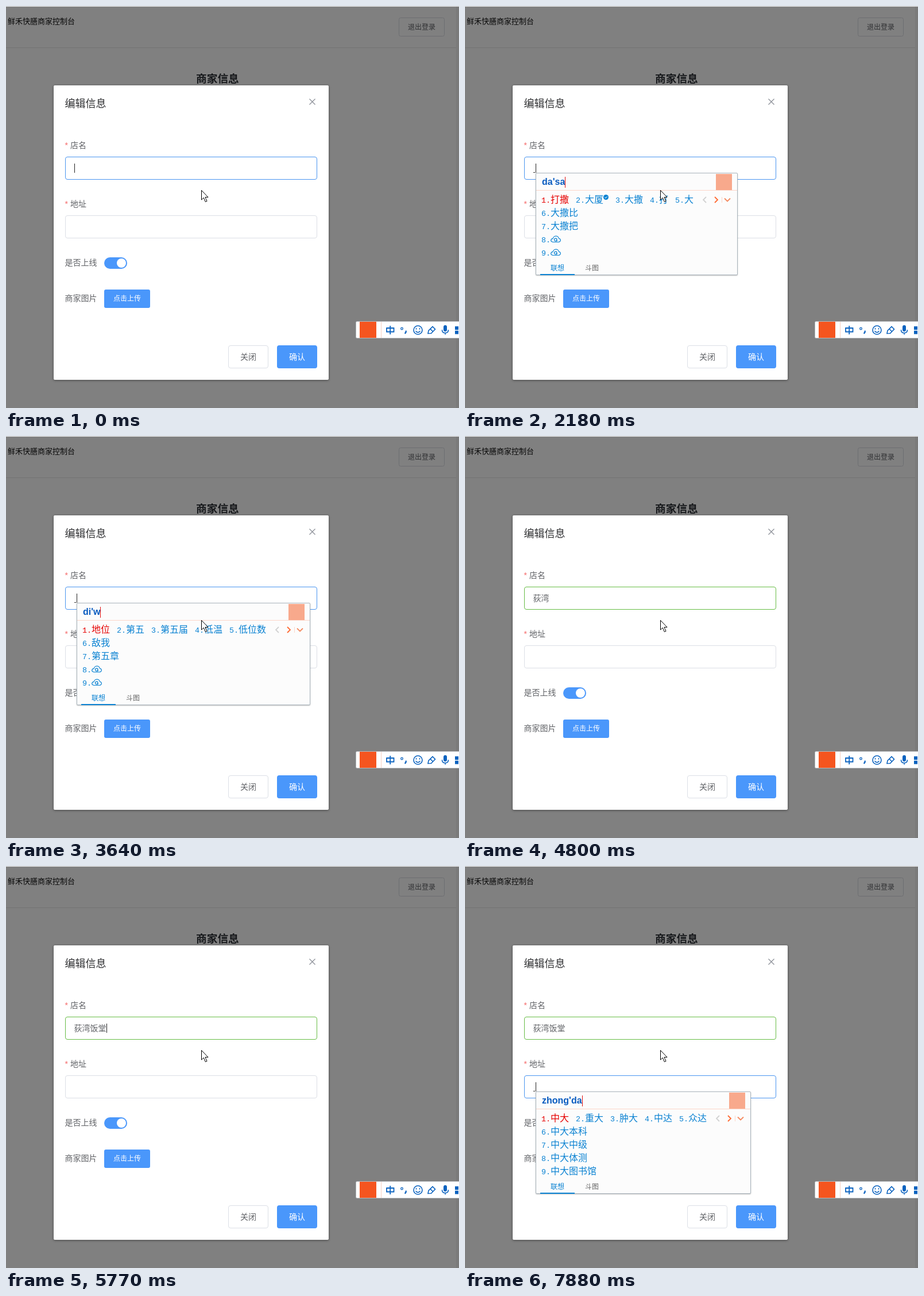
These frames come from a looping animation (789 by 699 pixels, 8000 ms). An HTML page:

```html
<!DOCTYPE html>
<html lang="zh-CN">
<head>
<meta charset="utf-8">
<title>编辑信息</title>
<style>
html, body { margin: 0; width: 100%; height: 100%; overflow: hidden; background: #808080; }
body { position: relative; font-family: "Noto Sans CJK SC", "Noto Sans CJK", sans-serif; }
svg { display: block; }
#stage, #pointer { position: absolute; left: 0; top: 0; }
#stage text { font-size: 14px; fill: #606266; }
#stage .small { font-size: 12px; }
#stage .star { fill: #f56c6c; font-family: "Liberation Sans", sans-serif; }
#dialog { filter: drop-shadow(0 1px 2px rgba(0, 0, 0, .45)); }
.field { fill: #fff; stroke: #dcdfe6; }

#ime {
  position: absolute; box-sizing: border-box; height: 178px; white-space: nowrap;
  background: #fcfcfc; border: 1px solid #a9b4bc; border-radius: 2px;
  box-shadow: 0 1px 2px rgba(0, 0, 0, .25); color: #0a82d2; font-size: 16px; font-weight: 300;
}
#ime .head {
  height: 29px; border-bottom: 1px solid #fcd5c8; padding-left: 10px; margin-bottom: 3px;
  font: bold 16px/29px "Liberation Sans", Arial, sans-serif; color: #0a5cc0;
}
#ime .head b { display: inline-block; width: 1px; height: 19px; background: #e01010; vertical-align: middle; }
#ime .row { height: 23px; line-height: 23px; padding: 0 76px 0 9px; }
#ime .row span + span { margin-left: 12px; }
#ime .first span:first-child { color: #e60000; }
#ime i { font: 13.33px/0 "Liberation Mono", monospace; }
#ime .logo { position: absolute; right: 9px; top: 1px; width: 28px; height: 28px; background: #f8a98c; }
#ime .nav { position: absolute; right: 9px; top: 38px; }
#ime .tick { display: inline-block; width: 9px; height: 9px; vertical-align: 5px; }
#ime .cloud { display: inline-block; vertical-align: -1px; }
#ime .tab { position: absolute; top: 155px; font-size: 12px; line-height: 18px; font-weight: 400; }
#ime .on { left: 7px; width: 60px; height: 20px; text-align: center; border-bottom: 2px solid #0a82d2; }
#ime .off { left: 85px; color: #666; }
</style>
</head>
<body>
<svg id="stage" width="789" height="699">
  <path d="M0 .5H789" stroke="#f4f4f4"/>
  <path d="M0 72.5H784" stroke="#737373"/>
  <path d="M784 1h5v698h-5z" fill="#7a7a7a"/>
  <text x="3" y="31" style="font-size:13px;fill:#080808">鲜禾快膳商家控制台</text>
  <rect x="684.5" y="20.5" width="79" height="32" rx="3" fill="none" stroke="#6d6e72"/>
  <text class="small" x="700" y="41" style="fill:#303133">退出登录</text>
  <text x="331" y="133" style="font-size:18.72px;font-weight:700;fill:#17191c">商家信息</text>

  <rect id="dialog" x="83" y="138" width="479" height="512" rx="2" fill="#fff"/>
  <text x="102.500" y="176" style="font-size:18px;fill:#303133">编辑信息</text>
  <path d="M528.500 161.500l10 10m0-10l-10 10" stroke="#8a8e96" stroke-width="1.200"/>

  <text class="star" x="102.500" y="247">*</text><text x="112" y="247">店名</text>
  <rect id="name" class="field" x="103.500" y="262.500" width="438" height="39" rx="3.500"/>
  <text id="value" x="118.500" y="287"></text>
  <text class="star" x="102.500" y="349">*</text><text x="112" y="349">地址</text>
  <rect id="addr" class="field" x="103.500" y="364.500" width="438" height="39" rx="3.500"/>
  <path id="mark" d="M0 15h3v1h-3z" fill="#333"/>
  <path id="caret" d="M0 0h1v16h-1z" fill="#222"/>

  <text x="102.500" y="451">是否上线</text>
  <rect x="171" y="437" width="40" height="20" rx="10" fill="#4a97fb"/>
  <circle cx="201" cy="447" r="8" fill="#fff"/>
  <text x="102.500" y="513">商家图片</text>
  <rect x="171" y="493" width="80" height="32" rx="3" fill="#4a97fb"/>
  <text class="small" x="187" y="513" style="fill:#fff;font-weight:500">点击上传</text>
  <rect x="387.500" y="590.500" width="69" height="39" rx="3.500" fill="#fff" stroke="#dcdfe6"/>
  <text x="408" y="615">关闭</text>
  <rect x="472" y="590" width="70" height="40" rx="4" fill="#4a97fb"/>
  <text x="493" y="615" style="fill:#fff;font-weight:500">确认</text>

  <rect x="609.500" y="548.500" width="185" height="29" rx="2" fill="#fff" stroke="#b5b9bd"/>
  <rect x="616" y="549" width="29" height="28" fill="#f5551f"/>
  <path d="M653.500 549v28" stroke="#f6cfc2"/>
  <g fill="none" stroke="#0a62bf" stroke-width="1.800">
    <path d="M663 560h12.500v6.500h-12.500zM669.200 556v15"/>
    <circle cx="689.500" cy="561" r="1.800" stroke-width="1.300"/>
    <path d="M696.500 564.500q1 3-2 5" stroke-width="2.200"/>
    <circle cx="717.500" cy="563.500" r="7.500" stroke-width="1.600"/>
    <path d="M713.500 565q4 5 8 0M714.500 560v2.500M720.500 560v2.500" stroke-width="1.500"/>
    <path d="M735 569.500l1-5 7-7 4.500 4.500-7 7.200zM739 561.500l4 4" stroke-width="1.600"/>
    <path d="M759.500 563q0 5.500 5.500 5.500t5.500-5.500M765 568.500v3" stroke-width="1.500"/>
  </g>
  <g fill="#0a62bf">
    <rect x="762" y="555" width="6" height="11" rx="3"/>
    <path d="M782 557h6v6h-6zM782 564.500h6v6h-6z"/>
  </g>
</svg>

<div id="ime"></div>

<svg id="pointer" width="789" height="699">
  <path d="M340.500 320.500v16.500l3.800-3.600 3 7.100 2.700-1.200-3-6.800h5z" fill="#fff" stroke="#000"/>
</svg>

<script>
const LOOP = 8000;
const BLUE = '#4a95f0', GREEN = '#67bd45', GREY = '#dcdfe6';

// Composed letters, numbered candidates, further suggestions.
const da = ['da', '大 打 达 搭 答', '打算 大概 大家 大学'];
const das = ["da's", '打扫 大厦✓ 大赛 大使 大', '大師 大四 ☁ ☁'];
const dasa = ["da'sa", '打撒 大厦✓ 大撒 打 大', '大撒比 大撒把 ☁ ☁'];
const dasan = ["da'san", '大三 打散 大 打 达', '大三元 大伞 ☁ ☁'];
const dasanf = ["da'san'f", '大三分 大三 打散 大 打', '大三方 打散发 ☁ ☁'];

// Each step changes only the listed parts of the state.
const steps = [
  { t: 0, text: '', name: BLUE, addr: GREY, line: 0, caret: 1, ime: null },
  { t: 370, caret: 0 },
  { t: 800, caret: 1, ime: da },
  { t: 1080, ime: das },
  { t: 1230, ime: dasa },
  { t: 1360, ime: dasan },
  { t: 1510, ime: dasanf },
  { t: 1910, caret: 0 },
  { t: 2040, caret: 1, ime: dasan },
  { t: 2180, ime: dasa },
  { t: 2310, ime: das },
  { t: 2450, ime: da },
  { t: 2720, ime: ['d', '的 点 对 到 の', '_(:３」∠)_ 代码 等等 但是'] },
  { t: 3250, ime: ['di', '第 地 低 底 地', '地方 第一 弟弟 地址'] },
  { t: 3520, ime: ["di'w", '地位 第五 第五届 低温 低位数', '敌我 第五章 ☁ ☁'] },
  { t: 3650, ime: ["di'wa", '低洼 地蛙 第 地 低', '低洼地 低洼处 ☁ ☁'] },
  { t: 3790, ime: ["di'wan", '荻湾 第 地 低 底', '第万 地湾 ☁ ☁'] },
  { t: 4220, ime: null, text: '荻湾', name: '#58a99b' },
  { t: 4370, name: GREEN },
  { t: 4800, caret: 0 },
  { t: 4950, caret: 1, ime: ['f', '发 分 放 飞 非', '方便 非常 发现 服务'] },
  { t: 5100, ime: ['fa', '发✓ 法 罚 乏 伐', '发现 发送 方法 发生'] },
  { t: 5370, ime: ["fan'tang", '饭堂✓ 饭堂里 翻糖 饭汤 饭堂菜', '翻糖蛋糕 饭堂阿姨 ☁ ☁'] },
  { t: 5770, ime: null, text: '荻湾饭堂' },
  { t: 6330, caret: 0 },
  { t: 6640, line: 1, caret: 1, addr: '#93b9eb' },
  { t: 6770, addr: BLUE },
  { t: 7060, caret: 0 },
  { t: 7190, caret: 1, ime: ['z', '在 中 值 再 做', '周砚禾 怎么 自己 最后'] },
  { t: 7310, ime: ['zh', '这 中 只 着 张', '这个 这样 知道 之后'] },
  { t: 7460, ime: ['zhong', '中 种 重 钟 终', '中国 中午 终于 重要'] },
  { t: 7760, ime: ["zhong'd", '中的 重点 中大 终点 种的', '重大 中等 中断 中东'] },
  { t: 7880, ime: ["zhong'da", '中大 重大 肿大 中达 众达', '中大本科 中大中级 中大体测 中大图书馆'] }
];
steps.reduce((prev, step) => Object.assign(step, { ...prev, ...step }), {});

const $ = id => document.getElementById(id);
const TICK = '<svg class="tick" viewBox="0 0 9 9"><circle cx="4.500" cy="4.500" r="4.500" fill="#0a82d2"/>' +
  '<path d="M2.300 4.500l1.700 1.700 2.800-3" fill="none" stroke="#fff"/></svg>';
const CLOUD = '<svg class="cloud" width="18" height="13" fill="none" stroke="#0a82d2" stroke-width="1.200">' +
  '<path d="M4 11.500q-3.500-.5-3.300-3.500.5-2.500 3.300-2.700 1.500-4.300 5.500-4.300 4 .2 4.800 4 3 .5 3 3.300t-3.500 3.200z' +
  'M12 8.500q-2 2-4.500 1-2-2-.3-4 2.500-1.500 3.800.5.300 2-1.700 2"/></svg>';
const NAV = '<svg class="nav" width="60" height="16" fill="none" stroke-width="1.800">' +
  '<path d="M15 3l-5 5 5 5" stroke="#d2d2d2"/><path d="M30 3l5 5-5 5" stroke="#ff6a33"/>' +
  '<path d="M42.500 3v10" stroke="#fcd5c8" stroke-width="1"/><path d="M47 5.500l5 5 5-5" stroke="#f4895f"/></svg>';

const entry = (word, n) => '<span>' +
  `${n}.${word}`.replace(/[!-~]+/g, '<i>$&</i>').replace('✓', TICK).replace('☁', CLOUD) + '</span>';

function imeHtml([letters, words, more]) {
  const first = words.split(' ').map((w, i) => entry(w, i + 1)).join('');
  const rest = more.split(' ').map((w, i) => `<div class="row">${entry(w, i + 6)}</div>`).join('');
  const bar = letters === 'z' ? ' style="background:#0a5cc0"' : '';
  return `<div class="head">${letters}<b${bar}></b></div><div class="row first">${first}</div>${rest}` +
    `<div class="logo"></div>${NAV}<div class="tab on">联想</div><div class="tab off">斗图</div>`;
}

function show({ text, name, addr, line, caret, ime }) {
  const x = 119 + (line ? 0 : text.length * 14), y = 274 + line * 102;
  $('value').textContent = text;
  $('name').style.stroke = name;
  $('addr').style.stroke = addr;
  $('mark').setAttribute('transform', `translate(${x} ${y})`);
  $('mark').style.display = ime ? '' : 'none';
  $('caret').setAttribute('transform', `translate(${x + (ime ? 4 : 0)} ${y})`);
  $('caret').style.display = caret ? '' : 'none';
  const box = $('ime');
  box.style.display = ime ? '' : 'none';
  box.style.left = x + 4 + 'px';
  box.style.top = y + 16 + 'px';
  if (ime) box.innerHTML = imeHtml(ime);
}

const start = performance.now();
let current;
function tick() {
  const t = (performance.now() - start) % LOOP;
  const step = steps.filter(s => s.t <= t).pop();
  if (step !== current) show(current = step);
  requestAnimationFrame(tick);
}
tick();
</script>
</body>
</html>
```
